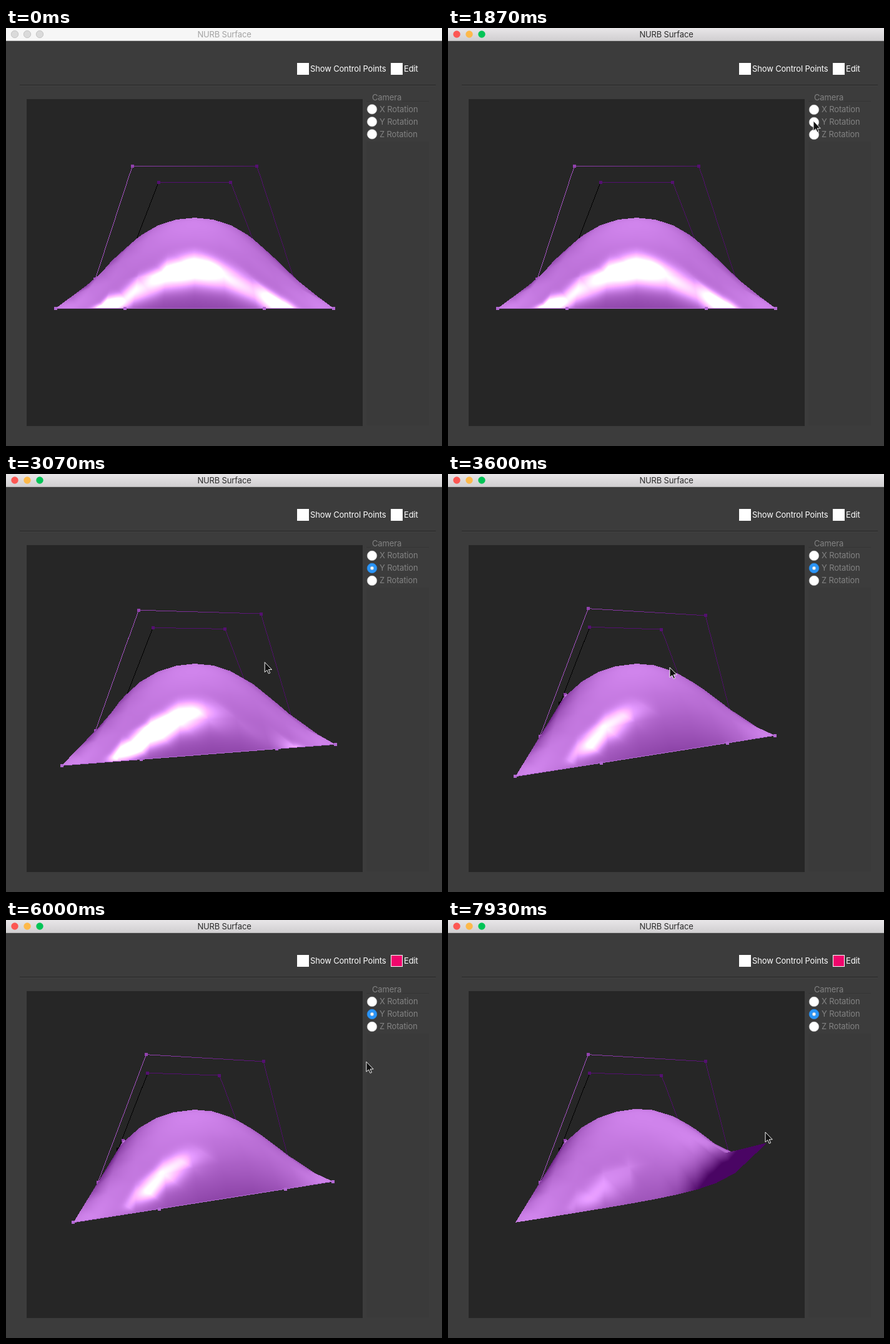
Write an HTML page with a canvas that moves like this. It is 698 px wide and 670 px high and loops after 8 s.

```html
<!DOCTYPE html>
<html lang="en">
<head>
<meta charset="utf-8">
<title>NURB Surface</title>
<style>
  html, body { margin: 0; width: 100%; height: 100%; overflow: hidden; background: #3c3c3c; }
  #stage { position: relative; width: 698px; height: 670px; overflow: hidden; }
  svg, canvas { position: absolute; left: 0; top: 0; }
  #view { left: 33px; top: 114px; }
  text { font: 13px Inter, Roboto, sans-serif; letter-spacing: -.15px; fill: #fff; }
  .dim text { fill: #838383; }
  #title { fill: #a3a3a3; text-anchor: middle; }
  #lights circle { fill: #dadada; stroke: #c6c6c6; }
  #bar { fill: #f6f6f6; }
  .radio circle { fill: #fff; stroke: #b5b5b5; stroke-width: .6; }
  #dot { visibility: hidden; }
  .active #title { fill: #2c2c2c; }
  .active #bar { fill: url(#barShade); }
  .active #lights circle { stroke: none; }
  .active #lights :nth-child(1) { fill: #fc5753; }
  .active #lights :nth-child(2) { fill: #fdb94a; }
  .active #lights :nth-child(3) { fill: #00c456; }
  .active .radio { transform: translateY(.7px); }
  .picked #yRadio { fill: #2b95f7; stroke: #2488ea; }
  .picked #dot { visibility: visible; }
  .edit #editBox { fill: #f0066c; stroke: #fff; }
</style>
</head>
<body>
<div id="stage">
  <svg id="ui" width="698" height="670">
    <defs>
      <linearGradient id="barShade" x2="0" y2="1">
        <stop stop-color="#e8e6e8"/><stop offset="1" stop-color="#d0ced0"/>
      </linearGradient>
    </defs>
    <rect width="698" height="670" fill="#3c3c3c"/>
    <rect id="bar" width="698" height="21"/>
    <rect y="20" width="698" height="1" fill="#b5b5b5"/>
    <g id="lights"><circle cx="14" cy="10" r="5.7"/><circle cx="34" cy="10" r="5.7"/><circle cx="54" cy="10" r="5.7"/></g>
    <text id="title" x="349.5" y="15">NURB Surface</text>
    <rect x="466" y="56" width="19" height="19" fill="#fff"/>
    <text x="487" y="70">Show Control Points</text>
    <rect id="editBox" x="616.5" y="56.5" width="18" height="18" fill="#fff" stroke="#fff"/>
    <text x="637" y="70">Edit</text>
    <path d="M22 91.5H688" stroke="#262626"/>
    <path d="M22 92.5H688" stroke="#434343"/>
    <rect x="577" y="117" width="100" height="520" fill="#3a3a3a"/>
    <path d="M577 117.5H677" stroke="#353535"/>
    <rect x="577" y="118" width="100" height="64" fill="#3c3c3c"/>
    <rect x="584" y="105" width="50" height="14" fill="#3c3c3c"/>
    <g class="dim">
      <text x="586" y="116">Camera</text>
      <text x="598" y="135">X Rotation</text>
      <text x="598" y="155">Y Rotation</text>
      <text x="598" y="175">Z Rotation</text>
    </g>
    <g class="radio">
      <circle cx="586" cy="130.2" r="7.8"/>
      <circle id="yRadio" cx="586" cy="150.2" r="7.8"/>
      <circle cx="586" cy="170.2" r="7.8"/>
      <circle id="dot" cx="586" cy="150.2" r="2.6"/>
    </g>
  </svg>
  <canvas id="view" width="538" height="524"></canvas>
  <svg width="698" height="670">
    <path id="cursor" d="M0 0V16L3.7 12.7 6.2 18.2 8.6 17.1 6.2 11.8H11.3Z" fill="#111" stroke="#f4f4f4"/>
  </svg>
</div>
<script>
const LOOP = 8000, W = 538, H = 524, FOCAL = 262, GRID = 10;
const EYE_Y = 0.7, EYE_Z = 2, DIST = Math.hypot(EYE_Y, EYE_Z);
const SIN_P = EYE_Y / DIST, COS_P = EYE_Z / DIST;
const STEPS = [-1, -0.5, 0.5, 1];

const ui = document.getElementById('ui');
const cursor = document.getElementById('cursor');
const ctx = document.getElementById('view').getContext('2d');
const image = ctx.createImageData(W, H);
const pixels = new Uint32Array(image.data.buffer);
const depth = new Float32Array(W * H);

const lerp = (a, b, k) => a + (b - a) * k;
const mix = (a, b, k) => a.map((v, i) => lerp(v, b[i], k));
const smooth = (t, a, b) => {
  const k = Math.min(1, Math.max(0, (t - a) / (b - a)));
  return k * k * (3 - 2 * k);
};
const dot = (a, b) => a[0] * b[0] + a[1] * b[1] + a[2] * b[2];
const unit = v => { const l = Math.hypot(...v) || 1; return v.map(c => c / l); };
const cross = (a, b) => [a[1] * b[2] - a[2] * b[1], a[2] * b[0] - a[0] * b[2], a[0] * b[1] - a[1] * b[0]];
const rgb = c => {
  const [r, g, b] = c.map(v => Math.max(0, Math.min(255, Math.round(v))));
  return (255 << 24 | b << 16 | g << 8 | r) >>> 0;
};

// Camera space: x right, y up, z towards the viewer (negative in front of the eye).
const LIGHT = unit([-0.02, 0.82, 0.57]);
const HALF = unit([LIGHT[0], LIGHT[1], LIGHT[2] + 1]);

const basis = t => {
  const s = 1 - t;
  return [s * s * s, 3 * s * s * t, 3 * s * t * t, t * t * t];
};
const slope = t => {
  const s = 1 - t;
  return [-3 * s * s, 3 * s * s - 6 * s * t, 6 * s * t - 3 * t * t, 3 * t * t];
};

function toCamera(x, y, z, angle) {
  const c = Math.cos(angle), s = Math.sin(angle);
  const rx = x * c + z * s, rz = z * c - x * s;
  return [rx, y * COS_P - rz * SIN_P, rz * COS_P + y * SIN_P - DIST];
}
const unproject = (sx, sy, d) => [(sx - 302) * d / FOCAL, (376 - sy) * d / FOCAL, -d];
const project = p => ({ x: W / 2 - FOCAL * p[0] / p[2], y: H / 2 + FOCAL * p[1] / p[2], iz: -1 / p[2] });

// Rows run from the front edge to the back.
const makeNet = angle => STEPS.map((z, row) => STEPS.map((x, col) =>
  toCamera(x, row % 3 && col % 3 ? 1 : 0, -z, angle)));

function blend(net, bu, bv) {
  const p = [0, 0, 0];
  net.forEach((row, j) => row.forEach((q, i) => {
    const w = bu[i] * bv[j];
    p[0] += q[0] * w; p[1] += q[1] * w; p[2] += q[2] * w;
  }));
  return p;
}

function shade(nx, ny, nz, shine) {
  const l = Math.hypot(nx, ny, nz) || 1;
  const n = [nx / l, ny / l, nz / l];
  const d = Math.max(0.5, dot(n, LIGHT));
  const s = 255 * shine * Math.pow(Math.max(0, dot(n, HALF)), 260);
  return rgb([268 * d - 60 + s, 255 * d - 123 + s, 273 * d - 37 + s]);
}

function triangle(a, b, c, shine) {
  const area = (b.x - a.x) * (c.y - a.y) - (b.y - a.y) * (c.x - a.x);
  if (Math.abs(area) < 1e-6) return;
  const x0 = Math.max(0, Math.floor(Math.min(a.x, b.x, c.x)));
  const x1 = Math.min(W - 1, Math.ceil(Math.max(a.x, b.x, c.x)));
  const y0 = Math.max(0, Math.floor(Math.min(a.y, b.y, c.y)));
  const y1 = Math.min(H - 1, Math.ceil(Math.max(a.y, b.y, c.y)));
  for (let y = y0; y <= y1; y++) for (let x = x0; x <= x1; x++) {
    const px = x + 0.5, py = y + 0.5;
    const wb = ((px - a.x) * (c.y - a.y) - (py - a.y) * (c.x - a.x)) / area;
    const wc = ((b.x - a.x) * (py - a.y) - (b.y - a.y) * (px - a.x)) / area;
    const wa = 1 - wb - wc;
    if (wa < 0 || wb < 0 || wc < 0) continue;
    const iz = wa * a.iz + wb * b.iz + wc * c.iz, at = y * W + x;
    if (iz <= depth[at]) continue;
    depth[at] = iz;
    const n = i => wa * a.n[i] + wb * b.n[i] + wc * c.n[i];
    pixels[at] = shade(n(0), n(1), n(2), shine);
  }
}

function plot(x, y, iz, color) {
  if (x < 0 || y < 0 || x >= W || y >= H) return;
  const at = y * W + x;
  if (iz * 1.002 >= depth[at]) pixels[at] = color;
}

function line(a, b, from, to) {
  const n = Math.ceil(Math.max(Math.abs(b.x - a.x), Math.abs(b.y - a.y)));
  for (let i = 0; i <= n; i++) {
    const k = i / n;
    plot(Math.floor(lerp(a.x, b.x, k)), Math.floor(lerp(a.y, b.y, k)), lerp(a.iz, b.iz, k), rgb(mix(from, to, k)));
  }
}

function square(p, color) {
  for (let y = -2; y <= 2; y++) for (let x = -2; x <= 2; x++)
    plot(Math.floor(p.x) + x, Math.floor(p.y) + y, p.iz, rgb(color));
}

const LILAC = [178, 104, 210], VIOLET = [146, 66, 174], PLUM = [84, 16, 112], DEEP = [74, 14, 98], BLACK = [0, 0, 0];
const NET_COLORS = [
  [LILAC, LILAC, LILAC, LILAC],
  [[164, 82, 194], VIOLET, PLUM, DEEP],
  [BLACK, PLUM, PLUM, DEEP],
  [VIOLET, PLUM, PLUM, DEEP]
];

function drawSurface(angle, dragging, pull) {
  pixels.fill(rgb([38, 38, 38]));
  depth.fill(0);
  const net = makeNet(angle), normals = makeNet(angle);
  if (dragging) {
    const corner = unproject(lerp(522, 511, pull), lerp(421, 357, pull), lerp(0.02, 0.28, pull));
    normals[0][3] = mix(net[0][3], corner, pull);
    net[0][3] = corner;
  }
  const shine = lerp(1.1, 0.22, pull);

  const mesh = [];
  for (let j = 0; j <= GRID; j++) for (let i = 0; i <= GRID; i++) {
    const u = i / GRID, v = j / GRID, bu = basis(u), bv = basis(v);
    const vertex = project(blend(net, bu, bv));
    vertex.n = unit(cross(blend(normals, slope(u), bv), blend(normals, bu, slope(v))));
    mesh.push(vertex);
  }
  for (let j = 0; j < GRID; j++) for (let i = 0; i < GRID; i++) {
    const k = j * (GRID + 1) + i, a = mesh[k], b = mesh[k + 1], c = mesh[k + GRID + 1], d = mesh[k + GRID + 2];
    triangle(a, b, c, shine);
    triangle(b, d, c, shine);
  }

  net.forEach((row, j) => {
    if (dragging && j === 0) return;
    const pts = row.map(project), colors = NET_COLORS[j];
    for (let i = 0; i < 3; i++) line(pts[i], pts[i + 1], colors[i], colors[i ? i + 1 : 0]);
    pts.forEach((p, i) => square(p, colors[i]));
  });
  ctx.putImageData(image, 0, 0);
}

// Pointer stops: time, x, y.
const PATH = [
  [560, 678, 40], [870, 646, 88], [1070, 608, 113], [1500, 585, 149], [2100, 585, 149],
  [2480, 476, 293], [2650, 476, 293], [3480, 355, 310], [3850, 355, 310], [4600, 624, 65],
  [5550, 624, 65], [6500, 522, 416], [7100, 522, 416], [7930, 508, 340], [LOOP, 508, 340]
];

function moveCursor(t) {
  cursor.style.visibility = t < PATH[0][0] ? 'hidden' : 'visible';
  const next = PATH.findIndex(stop => stop[0] > t);
  if (next < 1) return;
  const a = PATH[next - 1], b = PATH[next], k = smooth(t, a[0], b[0]);
  cursor.setAttribute('transform', `translate(${lerp(a[1], b[1], k)} ${lerp(a[2], b[2], k)})`);
}

let drawn = '';
const start = performance.now();

function frame() {
  const t = (performance.now() - start) % LOOP;
  ui.classList.toggle('active', t >= 1850);
  ui.classList.toggle('picked', t >= 2000);
  ui.classList.toggle('edit', t >= 5000);
  moveCursor(t);

  const angle = smooth(t, 2650, 3480) * 14.5 * Math.PI / 180;
  const dragging = t >= 6900;
  const pull = smooth(t, 7100, 7930);
  const key = [angle, dragging, pull].join();
  if (key !== drawn) {
    drawn = key;
    drawSurface(angle, dragging, pull);
  }
  requestAnimationFrame(frame);
}
frame();
</script>
</body>
</html>
```
